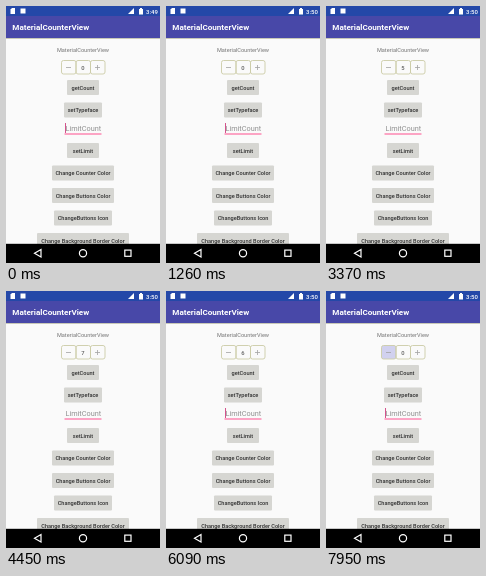
Recreate the animation shown at these times as an HTML page. Size 154x257 px, loop 8 s.

```html
<!DOCTYPE html>
<html lang="en">
<head>
<meta charset="utf-8">
<title>MaterialCounterView</title>
<style>
  html, body { margin: 0; width: 100%; height: 100%; overflow: hidden; background: #fafafa; }
  svg { display: block; width: 100%; height: 100%; }
  text { font-family: Roboto, sans-serif; text-anchor: middle; }
  .button rect { fill: #d6d6d2; }
  .button text { font-size: 5.6px; font-weight: 500; fill: #303030; }
  .outline { fill: none; stroke: #cccca8; stroke-width: .9; }
  .sign { fill: none; stroke: #a4a4a4; stroke-width: .8; }
  .nav { fill: none; stroke: #fff; stroke-width: 1.2; }
</style>
</head>
<body>
<svg viewBox="0 0 154 257">
  <defs>
    <clipPath id="minusClip"><rect x="55.5" y="54.5" width="14.5" height="13.5" rx="2"/></clipPath>
    <clipPath id="plusClip"><rect x="84.5" y="54.5" width="14.5" height="13.5" rx="2"/></clipPath>
  </defs>

  <rect width="154" height="257" fill="#fafafa"/>
  <rect y="32" width="154" height="1" fill="#c8c8b8"/>
  <rect y="10" width="154" height="22" fill="#4848a8"/>
  <rect width="154" height="10" fill="#2448a8"/>

  <g fill="#fff">
    <path d="M4.5 3.5L6 2h3v6H4.5z"/>
    <rect x="14.5" y="2.5" width="5" height="5"/>
    <path d="M122 8l6-6v6z"/>
    <path d="M133 3h1V2h2v1h1v5.5h-4z"/>
    <text id="clock" x="146" y="7.6" font-size="6" font-weight="500">3:49</text>
    <text x="6.3" y="24" font-size="8.1" font-weight="700" style="text-anchor:start">MaterialCounterView</text>
  </g>

  <text x="77" y="46" font-size="5.6" fill="#757575">MaterialCounterView</text>

  <g clip-path="url(#minusClip)"><circle id="minus" cx="62.5" cy="61.2" fill="#ceceef"/></g>
  <g clip-path="url(#plusClip)"><circle id="plus" cx="91.5" cy="61.2" fill="#ceceef"/></g>
  <rect class="outline" x="55.5" y="54.5" width="14.5" height="13.5" rx="2"/>
  <rect class="outline" x="70" y="54.5" width="14.5" height="13.5" rx="2"/>
  <rect class="outline" x="84.5" y="54.5" width="14.5" height="13.5" rx="2"/>
  <path class="sign" d="M60 61.5h5M89 61.5h5M91.5 59v5"/>
  <text id="count" x="77" y="63.5" font-size="5.8" font-weight="500" fill="#606060">0</text>

  <text x="77.3" y="125" font-size="7.3" fill="#909090">LimitCount</text>
  <rect x="58.5" y="127.5" width="37" height="1" fill="#ff5090"/>
  <rect id="cursor" x="59" y="117" width=".9" height="10" fill="#d0407f"/>

  <g id="buttons"></g>

  <rect y="237.8" width="154" height="20" fill="#000"/>
  <path class="nav" d="M35 243.5v7.4l-6.5-3.7z"/>
  <circle class="nav" cx="77" cy="247.2" r="3.6"/>
  <rect class="nav" x="118.8" y="244.1" width="6.2" height="6.2"/>
</svg>

<script>
  const LOOP = 8000;
  const byId = id => document.getElementById(id);

  const buttons = [
    ['getCount', 81.5, 32],
    ['setTypeface', 104, 38],
    ['setLimit', 144.5, 32],
    ['Change Counter Color', 167, 62],
    ['Change Buttons Color', 189.5, 62],
    ['ChangeButtons Icon', 212, 58],
    ['Change Background Border Color', 234.5, 92]
  ];
  byId('buttons').innerHTML = buttons.map(([label, y, width]) => `
    <g class="button">
      <rect x="${77 - width / 2}" y="${y - 7.5}" width="${width}" height="15" rx="1"/>
      <text x="77" y="${y + 2}">${label}</text>
    </g>`).join('');

  const plusTaps = [1430, 1780, 2130, 2620, 3080, 3600, 4120, 4680];
  const minusTaps = [5400, 5910, 6690, 6710, 6900, 7100, 7300, 7480, 7680, 7880];
  const tapsBefore = (taps, t) => taps.filter(tap => tap <= t).length;

  function drawRipple(id, taps, t) {
    const age = t - (taps.filter(tap => tap <= t).pop() ?? -LOOP);
    const circle = byId(id);
    circle.setAttribute('r', 4 + 7 * Math.min(1, age / 60));
    circle.setAttribute('opacity', Math.max(0, Math.min(1, 1.5 * (1 - age / 180))));
  }

  function draw(now) {
    const time = now % LOOP;
    // The screen freezes briefly between the second and third decrement.
    const t = time >= 6090 && time < 6710 ? 6090 : time;
    const phase = t % 1000;

    byId('clock').textContent = t < 860 ? '3:49' : '3:50';
    byId('count').textContent =
      Math.max(0, tapsBefore(plusTaps, t) - tapsBefore(minusTaps, t));
    byId('cursor').setAttribute('opacity', phase >= 320 && phase < 820 ? 0 : 1);
    drawRipple('plus', plusTaps, t);
    drawRipple('minus', minusTaps, t);
  }

  const start = performance.now();
  function tick() {
    draw(performance.now() - start);
    requestAnimationFrame(tick);
  }
  tick();
</script>
</body>
</html>
```
